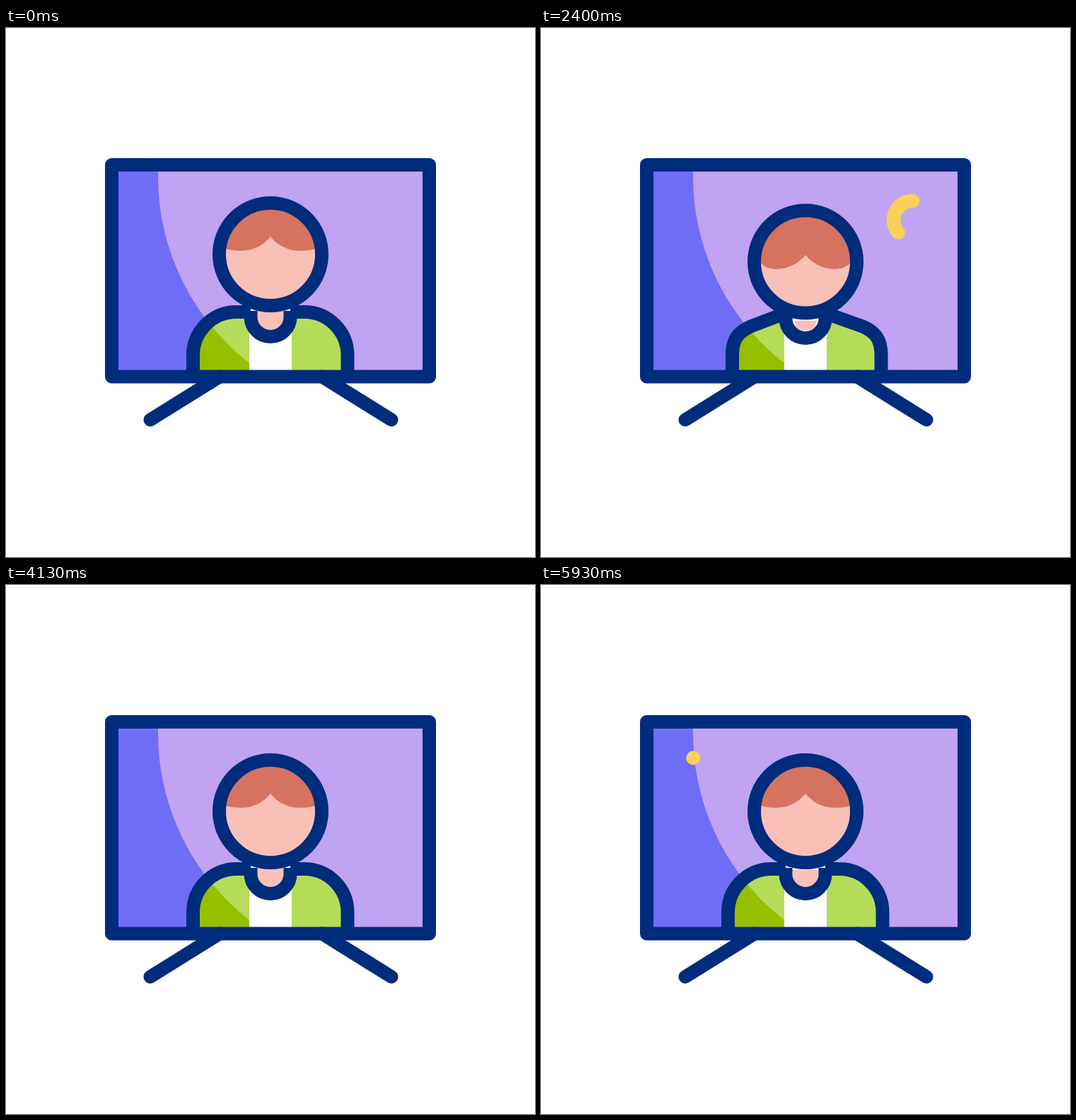
Recreate the animation shown at these times as an HTML page. Size 748x748 px, loop 5990 ms.

```html
<!DOCTYPE html>
<html lang="en">
<head>
<meta charset="utf-8">
<title>Person on a screen</title>
<style>
  html, body { margin: 0; width: 100%; height: 100%; overflow: hidden; background: #fff; }
  svg { display: block; width: 100vw; height: 100vh; }
  .line { fill: none; stroke: #002c7c; stroke-width: 19; }
  .spark { fill: none; stroke: #fbd057; stroke-width: 19.5; stroke-linecap: round; }
</style>
</head>
<body>
<svg viewBox="0 0 748 748">
  <defs>
    <clipPath id="screen"><rect x="150" y="194" width="448" height="299"/></clipPath>
    <clipPath id="jacket"><path id="jacketClip"/></clipPath>
    <clipPath id="face"><circle r="66"/></clipPath>
  </defs>

  <rect x="150" y="194" width="448" height="299" fill="#6f6df6"/>
  <g clip-path="url(#screen)"><circle cx="549" cy="210" r="334" fill="#c0a3f2"/></g>

  <path id="jacketFill" fill="#96bf00"/>
  <g clip-path="url(#jacket)"><circle cx="549" cy="210" r="334" fill="#b5dc58"/></g>
  <path id="shirt" fill="#fff"/>
  <path id="shoulders" class="line"/>

  <g id="collar">
    <path d="M346 396V408.500A28 28 0 0 0 402 408.500V396Z" fill="#fff"/>
    <path id="neck" d="M353 395H395L393 409A19 19 0 0 1 355 409Z" fill="#f9c0b8"/>
    <path class="line" d="M346 400V408.500A28 28 0 0 0 402 408.500V400"/>
  </g>

  <g id="head">
    <circle r="68" fill="#f9c0b8"/>
    <g clip-path="url(#face)"><path id="hair" fill="#d57360"/></g>
    <circle class="line" r="72.500"/>
  </g>

  <path id="sparkL" class="spark" pathLength="1" d="M215.500 244.500a27 27 0 0 1 0 54a27 27 0 0 1 0 -54"/>
  <path id="sparkR" class="spark" pathLength="1" d="M525.500 244.500a27 27 0 0 0 0 54a27 27 0 0 0 0 -54"/>

  <rect class="line" x="149.500" y="193.500" width="449" height="299.500" stroke-linejoin="round"/>
  <path class="line" stroke-linecap="round" d="M302 493L204 554M447 493L545 554"/>
</svg>

<script>
const LOOP = 5990, CYCLE = 2000, STEP = 200 / 3;
const $ = id => document.getElementById(id);
const set = (id, name, value) => $(id).setAttribute(name, value);
const mix = (a, b, k) => a + (b - a) * k;
const clamp = v => Math.max(0, Math.min(1, v));
const smooth = k => k * k * (3 - 2 * k);

// x, y: head; px, py: hair parting; lx, ly, le and rx, ry, re: hair lobes and their outer edges;
// sl, sr: shoulders; drop: slope of the shoulders; lean: shirt; dy: collar; neck: visible skin
const rest = { x: 374, y: 320, px: 0, py: -25, lx: -41, ly: -5, le: -9, rx: 41, ry: -5, re: -9,
               sl: 264.5, sr: 483, drop: 0, lean: 0, dy: 0, neck: 1 };
const down = { x: 374, y: 330.5, px: 0, py: -9.5, lx: -42, ly: 10.5, le: -1, rx: 42, ry: 10.5, re: -1,
               sl: 270.5, sr: 481, drop: 1, lean: 0, dy: 2, neck: 0.75 };
const right = { ...down, x: 381.5, px: 15.5, py: -11.5, lx: -27, ly: 8, le: -5, rx: 55, ry: 11.5, re: 11,
                sl: 263.5, sr: 467, dy: 1, neck: 0.3 };
const left = { ...down, x: 366.5, px: -18, py: -10, lx: -47, ly: 8.5, le: 0, rx: 27, ry: 12.5, re: 0,
               sl: 282.5, sr: 476, lean: 1, dy: -0.5, neck: 0.5 };

const keys = [
  [0, rest], [140, rest], [390, down], [410, down], [730, right],
  [1070, { ...right, neck: 0 }], [1480, left], [1600, left],
  [1910, { ...rest, neck: 0.9 }], [1950, { ...rest, neck: 0.9 }], [CYCLE, rest]
];

function poseAt(t) {
  const i = keys.findIndex(key => key[0] > t);
  const [t0, a] = keys[i - 1], [t1, b] = keys[i];
  const k = smooth((t - t0) / (t1 - t0));
  const pose = {};
  for (const name in a) pose[name] = mix(a[name], b[name], k);
  return pose;
}

// One shoulder from the bottom edge up to the collar; dir is 1 for left, -1 for right
function shoulder(x, dir, drop) {
  const at = (dx, y, dx2, y2) => `${x + dir * mix(dx, dx2, drop)} ${mix(y, y2, drop)}`;
  const end = 374 - dir * mix(28, 33, drop);
  return `M${x} 488V463C${at(0, 429, 0, 440)} ${at(27.5, 401.5, 8, 430)} ` +
         `${at(61, 401.5, 26, 422)}L${end} ${mix(401.5, 405, drop)}`;
}

function lobe(p, x, y, edge, dir) {
  return { inner: `${p.px + dir * 9} ${p.py + 11}`, low: `${x - dir * 18} ${y}`,
           tip: `${x} ${y}`, bend: `${x * 0.35 + dir * 42} ${y}`, edge: `${dir * 66} ${edge}` };
}

function drawHair(p) {
  const l = lobe(p, p.lx, p.ly, p.le, -1), r = lobe(p, p.rx, p.ry, p.re, 1);
  set('hair', 'd', `M-70 -70L${l.edge}Q${l.bend} ${l.tip}C${l.low} ${l.inner} ${p.px} ${p.py}` +
                   `C${r.inner} ${r.low} ${r.tip}Q${r.bend} ${r.edge}L70 -70Z`);
}

function drawSpark(id, t) {
  const head = clamp(t / 510), tail = clamp((t - 300) / 510);
  const on = head > tail;
  set(id, 'visibility', on ? 'visible' : 'hidden');
  if (!on) return;
  set(id, 'stroke-dasharray', `${head - tail} 2`);
  set(id, 'stroke-dashoffset', -tail);
}

function draw(t) {
  const p = poseAt(t);
  const sides = [shoulder(p.sl, 1, p.drop), shoulder(p.sr, -1, p.drop)];
  const fill = sides.map(s => s + 'H374V488Z').join('');
  set('shoulders', 'd', sides.join(''));
  set('jacketFill', 'd', fill);
  set('jacketClip', 'd', fill);
  set('shirt', 'd', `M${344 + 3 * p.lean} 425L${344 + 8 * p.lean} 488H${404 + 4 * p.lean}L${404 + p.lean} 425Z`);
  set('collar', 'transform', `translate(0 ${p.dy})`);
  set('neck', 'transform', `translate(374 424) scale(${p.neck} ${p.neck ** 3}) translate(-374 -424)`);
  set('head', 'transform', `translate(${p.x} ${p.y})`);
  drawHair(p);
  drawSpark('sparkR', t - 215);
  drawSpark('sparkL', t - 1125);
}

function tick() {
  const step = Math.floor((performance.now() % LOOP + 4) / STEP);
  draw(step * STEP % CYCLE);
  requestAnimationFrame(tick);
}
tick();
</script>
</body>
</html>
```
